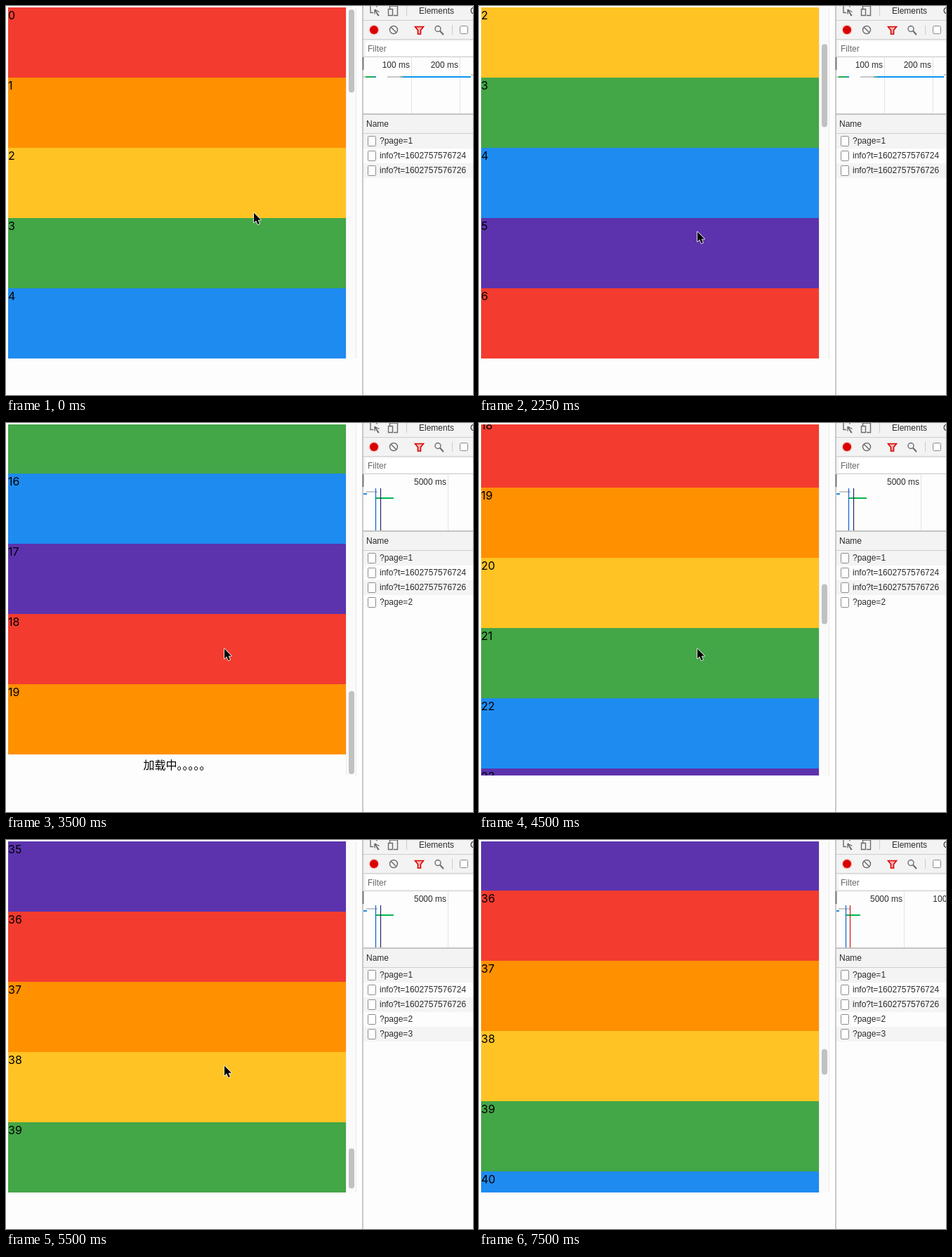
Write an HTML page that moves like this. It is 665 px wide and 554 px high and loops after 8 s.

```html
<!DOCTYPE html>
<html lang="en">
<head>
<meta charset="utf-8">
<title>Infinite scroll</title>
<style>
  html, body { margin: 0; width: 100%; height: 100%; overflow: hidden; background: #fdfdfd; }
  #stage { display: block; width: 665px; height: 554px; }
  text { white-space: pre; }
  .list text { font: 16px Inter, "Noto Sans CJK SC", "Noto Sans CJK", sans-serif; fill: #000; }
  .panel text { font: 12px "Liberation Sans", Arial, sans-serif; fill: #2b2b2b; }
  .line { stroke: #6b6b6b; stroke-width: 1.4; fill: none; }
</style>
</head>
<body>
<svg id="stage" viewBox="0 0 665 554">
  <rect width="665" height="554" fill="#fdfdfd"/>

  <svg class="list" x="3" y="2" width="481" height="500">
    <g id="content">
      <g id="bands"></g>
      <g id="loading">
        <rect width="481" height="30" fill="#fdfdfd"/>
        <text x="240.5" y="21" text-anchor="middle">加载中。。。。。</text>
      </g>
    </g>
  </svg>
  <rect x="484" y="2" width="15" height="500" fill="#fafafa"/>
  <path d="M484.5 2V502M498.5 2V502" stroke="#ebebeb"/>
  <rect id="thumb" x="488" width="8" rx="4" fill="#c1c1c1"/>

  <g class="panel">
    <rect x="508" width="157" height="73" fill="#f3f3f3"/>
    <path d="M508 20.5H665M508 47.5H665M508 72.5H665" stroke="#cdcdcd"/>
    <path class="line" d="M528 1.5V0M519 0V9.5H523M530 14L525 5M525 5V11.5M525 5L531.5 8.5M525 5L531 14"/>
    <path class="line" d="M546.5 4V0H557.5V13.5H552M544.5 4.5H550.5V13.5H544.5Z"/>
    <path d="M570.5 0V14M635.5 27V41" stroke="#cbcbcb"/>
    <text x="588" y="11">Elements</text>
    <text x="661" y="11">Console</text>

    <circle cx="524" cy="34" r="7.5" fill="#f5caca"/>
    <circle cx="524" cy="34" r="6" fill="#d90000"/>
    <circle class="line" cx="552" cy="34" r="5.5"/>
    <path class="line" d="M548 30L556 38"/>
    <path d="M582.5 29.5H594.5L590.5 34.5V40H586.5V34.5Z" fill="#f2b3b3" stroke="#d00" stroke-width="1.6"/>
    <circle class="line" cx="615" cy="32.5" r="4"/>
    <path class="line" d="M618 35.5L623 41" style="stroke-width:2"/>
    <rect x="646.5" y="28.5" width="11" height="11" rx="2" fill="#fff" stroke="#888"/>
    <text x="664" y="38">P</text>

    <rect x="512" y="50" width="153" height="21" fill="#fff"/>
    <text x="515" y="65" style="fill:#666">Filter</text>

    <g id="overview"></g>
    <path d="M508 154H665" stroke="#c4c4c4" stroke-width="2"/>
    <rect x="508" y="155" width="157" height="26" fill="#f3f3f3"/>
    <path d="M508 181.5H665" stroke="#cdcdcd"/>
    <text x="513" y="172">Name</text>
    <g id="requests"></g>
    <path d="M508 0V554" stroke="#bcbcbc" stroke-width="1.6"/>
    <path d="M508.5 73V91" stroke="#777" stroke-width="2"/>
  </g>

  <path id="cursor" d="M0 0V14L3.2 11L5.6 16.4L8 15.4L5.7 10.2H10Z"
        stroke="#fff" stroke-width="1.6" paint-order="stroke" stroke-linejoin="round"/>
</svg>
<script>
  const LOOP = 8000, STEP = 250, VIEW = 500, BAND = 100;
  const COLORS = ['#f33b2f', '#ff9000', '#ffc324', '#43a647', '#1e8bf0', '#5c33ad'];
  const REQUESTS = ['?page=1', 'info?t=1602757576724', 'info?t=1602757576726', '?page=2', '?page=3'];

  // Each list holds [start time, value] pairs; a value lasts until the next start.
  const SCROLL = [[0, 0], [1500, 72], [1750, 159], [2000, 196], [2250, 200], [2500, 520],
    [2750, 1023], [3000, 1400], [3250, 1515], [3500, 1530], [4000, 1544], [4250, 1551],
    [4500, 1810], [4750, 2380], [5000, 2895], [5250, 3300], [5500, 3500], [5750, 3530]];
  const LOADED = [[0, 20], [4000, 40], [6500, 60]];
  const SENT = [[0, 3], [3000, 4], [5250, 5]];
  const CURSOR = [[0, [353, 294.5]], [250, [312, 321.5]], [500, [311, 321.5]],
    [6750, [310, 324.5]], [7250, [579, 61]], [7500, [-50, -50]]];
  const OVERVIEW = [[0, 'start'], [3000, 'second'], [6250, 'third'], [6500, 'wide']];

  const $ = id => document.getElementById(id);
  const at = (track, t) => track.filter(([start]) => start <= t).pop()[1];

  const bar = (x1, x2, y, color) =>
    `<path d="M${x1} ${y}H${x2}" stroke="${color}" stroke-width="2"/>`;
  const marker = (x, color) => `<path d="M${x}.5 93V153" stroke="${color}" stroke-width="1.2"/>`;
  const tick = (x, label) =>
    `<path d="M${x}.5 73V153" stroke="#e3e3e3"/><text x="${x - 2}" y="88" text-anchor="end">${label} ms</text>`;

  const secondBars = bar(509, 514, 101, '#1a8fe8') + bar(513, 529, 98, '#c8c8c8') +
    bar(527, 552, 107, '#00b84a') + marker(526, '#0a62c9') + marker(533, '#22265e');
  const thirdBars = bar(509, 513, 101, '#1a8fe8') + bar(512, 528, 98, '#c8c8c8') +
    bar(523, 543, 107, '#00b84a') + marker(522, '#0a62c9') + marker(528, '#c41a1a');
  const CHARTS = {
    start: tick(577, 100) + tick(646, 200) + bar(509, 512, 101, '#c8c8c8') +
      bar(512, 524, 101, '#18b04c') + bar(524, 527, 101, '#1a8fe8') +
      bar(543, 562, 101, '#c8c8c8') + bar(562, 566, 101, '#6aa58c') +
      bar(566, 662, 101, '#0b95f0') + bar(662, 665, 98, '#c8c8c8'),
    second: tick(629, 5000) + secondBars,
    third: tick(629, 5000) + thirdBars,
    wide: tick(605, 5000) + tick(701, 10000) + thirdBars
  };

  $('bands').innerHTML = Array.from({ length: 60 }, (_, i) =>
    `<rect y="${i * BAND}" width="481" height="${BAND}" fill="${COLORS[i % 6]}"/>
     <text y="${i * BAND + 17}">${i}</text>`).join('');

  $('requests').innerHTML = REQUESTS.map((name, i) => {
    const y = 182 + i * 21;
    return `<g><rect x="508" y="${y}" width="157" height="21" fill="${i % 2 ? '#fdfdfd' : '#f4f4f4'}"/>
      <rect x="515.5" y="${y + 3.5}" width="11" height="14" rx="1" fill="#fff" stroke="#8c8c8c"/>
      <text x="532" y="${y + 14}">${name}</text></g>`;
  }).join('');

  function draw(t) {
    const scroll = at(SCROLL, t), count = at(LOADED, t), sent = at(SENT, t);
    const ratio = VIEW / (count * BAND + 30);
    $('content').setAttribute('transform', `translate(0 ${-scroll})`);
    $('loading').setAttribute('transform', `translate(0 ${count * BAND})`);
    $('thumb').setAttribute('y', 5 + scroll * ratio);
    $('thumb').setAttribute('height', VIEW * ratio - 5);
    $('overview').innerHTML = CHARTS[at(OVERVIEW, t)];
    [...$('requests').children].forEach((row, i) => row.style.display = i < sent ? '' : 'none');
    $('cursor').setAttribute('transform', `translate(${at(CURSOR, t)})`);
  }

  const begin = performance.now();
  let shown = -1;
  function frame() {
    const step = Math.floor((performance.now() - begin) % LOOP / STEP);
    if (step !== shown) draw((shown = step) * STEP);
    requestAnimationFrame(frame);
  }
  frame();
</script>
</body>
</html>
```
